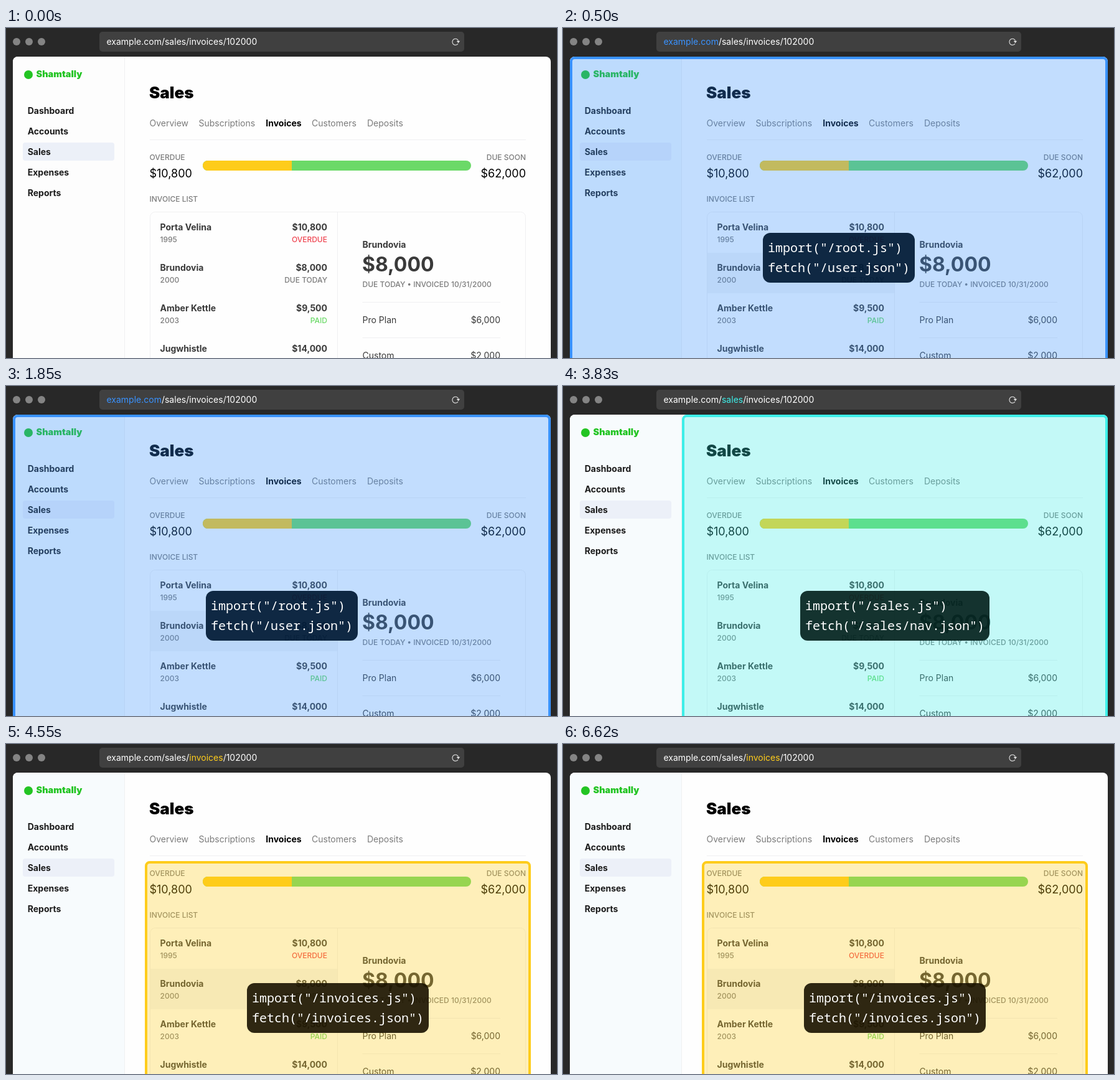
An HTML page for the animation above (8000 ms loop, 885 by 530 pixels).

```html
<!DOCTYPE html>
<html lang="en">
<head>
<meta charset="utf-8">
<title>Nested routes</title>
<style>
  html, body { margin: 0; width: 100%; height: 100%; overflow: hidden; background: #282828; }
  svg { display: block; width: 885px; height: 530px; font: 14px Inter, sans-serif; }
  .b { font-weight: 700; }
  .e { text-anchor: end; }
  .black { font-weight: 900; }
  .label { font-size: 12px; font-weight: 500; fill: #7b7b7b; }
  .tab { fill: #7b7b7b; }
  .big { font-size: 18px; }
  .dark { fill: #3a3a3a; }
  .nav { fill: #1c1c1c; }
  .red { fill: #ef4450; }
  .green { fill: #6bd968; }
  .line { fill: none; stroke: #f0f0f1; }
  .code { font: 20px "Noto Sans Mono", monospace; fill: #fff; }

  .side, .pick, .scene, .url tspan { animation: 8s step-end infinite; }
  .side { animation-name: side; }
  .pick { animation-name: pick; }
  .root { animation-name: root; }
  .sales { animation-name: sales; }
  .invoices { animation-name: invoices; }
  .url .u1 { animation-name: u1; }
  .url .u2 { animation-name: u2; }
  .url .u3 { animation-name: u3; }

  @keyframes side { 0% { fill: #fdfdfd } 6.25%, 100% { fill: #f7fbfd } }
  @keyframes pick { 0%, 34.375% { opacity: 0 } 6.25%, 56.875%, 100% { opacity: 1 } }
  @keyframes root { 0%, 34.375%, 100% { opacity: 0 } 6.25% { opacity: 1 } }
  @keyframes sales { 0%, 56.875%, 100% { opacity: 0 } 34.375% { opacity: 1 } }
  @keyframes invoices { 0% { opacity: 0 } 56.875%, 100% { opacity: 1 } }
  @keyframes u1 { 0%, 34.375%, 100% { fill: #fff } 6.25% { fill: #3992ff } }
  @keyframes u2 { 0%, 56.875%, 100% { fill: #fff } 34.375% { fill: #3defe9 } }
  @keyframes u3 { 0% { fill: #fff } 56.875%, 100% { fill: #fecc1b } }
</style>
</head>
<body>
<svg viewBox="0 0 885 530">
  <defs>
    <clipPath id="page"><rect x="11" y="46" width="864" height="500" rx="8"/></clipPath>
    <clipPath id="bar"><rect x="316" y="213" width="431" height="16" rx="8"/></clipPath>
  </defs>

  <!-- browser chrome -->
  <rect width="885" height="530" fill="#282828"/>
  <g fill="#848484"><circle cx="17" cy="22" r="6"/><circle cx="37" cy="22" r="6"/><circle cx="57" cy="22" r="6"/></g>
  <rect x="150" y="6" width="586" height="32" rx="5" fill="#404040"/>
  <text class="url" x="161.5" y="27" fill="#fff"><tspan class="u1">example.com</tspan>/<tspan class="u2">sales</tspan>/<tspan class="u3">invoices</tspan>/102000</text>
  <path d="M726 25.2A5 5 0 1 1 726.6 20.6" fill="none" stroke="#e4e4e4" stroke-width="1.1"/>
  <path d="M723.6 20.8H729.2L726.6 24.2Z" fill="#e4e4e4"/>

  <!-- page -->
  <g clip-path="url(#page)">
    <rect x="11" y="46" width="864" height="484" fill="#fefefe"/>
    <rect class="side" x="11" y="46" width="179" height="484"/>
    <path class="line" d="M190.5 46V530"/>
  </g>

  <!-- sidebar -->
  <circle cx="36" cy="75" r="7" fill="#23c423"/>
  <text class="black" x="48.5" y="79" font-size="14.5" fill="#23c423">Shamtally</text>
  <rect x="27" y="184" width="147" height="29" rx="4" fill="#ecf0f8"/>
  <g class="b nav">
    <text x="34.7" y="138">Dashboard</text>
    <text x="34.7" y="171">Accounts</text>
    <text x="34.7" y="204">Sales</text>
    <text x="34.7" y="237">Expenses</text>
    <text x="34.7" y="270">Reports</text>
  </g>

  <!-- heading and tabs -->
  <text class="black" x="230" y="113" font-size="26">Sales</text>
  <g class="tab">
    <text x="230.5" y="158">Overview</text>
    <text x="309.5" y="158">Subscriptions</text>
    <text x="491" y="158">Customers</text>
    <text x="580" y="158">Deposits</text>
  </g>
  <text class="b" x="417.3" y="158">Invoices</text>
  <path class="line" d="M231 179.5H835"/>

  <!-- totals -->
  <text class="label" x="230.5" y="212">OVERDUE</text>
  <text class="big" x="230.5" y="240">$10,800</text>
  <text class="label e" x="835" y="212">DUE SOON</text>
  <text class="big e" x="835" y="240">$62,000</text>
  <g clip-path="url(#bar)">
    <rect x="316" y="213" width="431" height="16" fill="#6bd968"/>
    <rect x="316" y="213" width="143" height="16" fill="#fecc1b"/>
  </g>

  <!-- invoice list -->
  <text class="label" x="230.5" y="279">INVOICE LIST</text>
  <rect class="pick" x="232" y="361" width="300" height="65" fill="#f4f5f6"/>
  <rect class="line" x="231.5" y="295.5" width="603" height="260" rx="8"/>
  <path class="line" d="M532.5 296V530M572.5 440.5H794M572.5 497.5H794"/>
  <g class="b dark">
    <text x="247.5" y="325">Porta Velina</text>
    <text x="247.5" y="390">Brundovia</text>
    <text x="247.5" y="455">Amber Kettle</text>
    <text x="247.5" y="520">Jugwhistle</text>
    <g class="e">
      <text x="516" y="325">$10,800</text>
      <text x="516" y="390">$8,000</text>
      <text x="516" y="455">$9,500</text>
      <text x="516" y="520">$14,000</text>
    </g>
  </g>
  <g class="label">
    <text x="247.5" y="344">1995</text>
    <text x="247.5" y="409">2000</text>
    <text x="247.5" y="474">2003</text>
    <g class="e">
      <text class="red" x="516" y="344">OVERDUE</text>
      <text x="516" y="409">DUE TODAY</text>
      <text class="green" x="516" y="474">PAID</text>
    </g>
  </g>

  <!-- invoice detail -->
  <g class="dark">
    <text class="b" x="572.5" y="353">Brundovia</text>
    <text class="b" x="572" y="391" font-size="32">$8,000</text>
    <text x="572.5" y="474">Pro Plan</text>
    <text class="e" x="794" y="474">$6,000</text>
    <text x="572.5" y="531">Custom</text>
    <text class="e" x="794" y="531">$2,000</text>
  </g>
  <text class="label" x="572.5" y="416">DUE TODAY • INVOICED 10/31/2000</text>

  <!-- route highlights -->
  <g class="scene root">
    <rect x="11" y="46" width="864" height="500" rx="8" fill="#3992ff" fill-opacity=".3"/>
    <rect x="13" y="48" width="860" height="500" rx="6" fill="none" stroke="#3992ff" stroke-width="4"/>
    <rect x="321" y="329" width="244" height="80" rx="12" fill="#001934" fill-opacity=".92"/>
    <text class="code" x="329" y="360">import("/root.js")</text>
    <text class="code" x="329" y="392">fetch("/user.json")</text>
  </g>
  <g class="scene sales">
    <rect x="191" y="46" width="684" height="500" rx="8" fill="#3defe9" fill-opacity=".3"/>
    <rect x="193" y="48" width="680" height="500" rx="6" fill="none" stroke="#3defe9" stroke-width="4"/>
    <rect x="381" y="329" width="304" height="80" rx="12" fill="#021e1a" fill-opacity=".9"/>
    <text class="code" x="389" y="360">import("/sales.js")</text>
    <text class="code" x="389" y="392">fetch("/sales/nav.json")</text>
  </g>
  <g class="scene invoices">
    <rect x="223" y="188" width="620" height="360" rx="8" fill="#fecc1b" fill-opacity=".3"/>
    <rect x="225" y="190" width="616" height="360" rx="6" fill="none" stroke="#fecc1b" stroke-width="4"/>
    <rect x="387" y="384" width="292" height="80" rx="12" fill="#191200" fill-opacity=".9"/>
    <text class="code" x="395" y="415">import("/invoices.js")</text>
    <text class="code" x="395" y="447">fetch("/invoices.json")</text>
  </g>
</svg>
</body>
</html>
```
